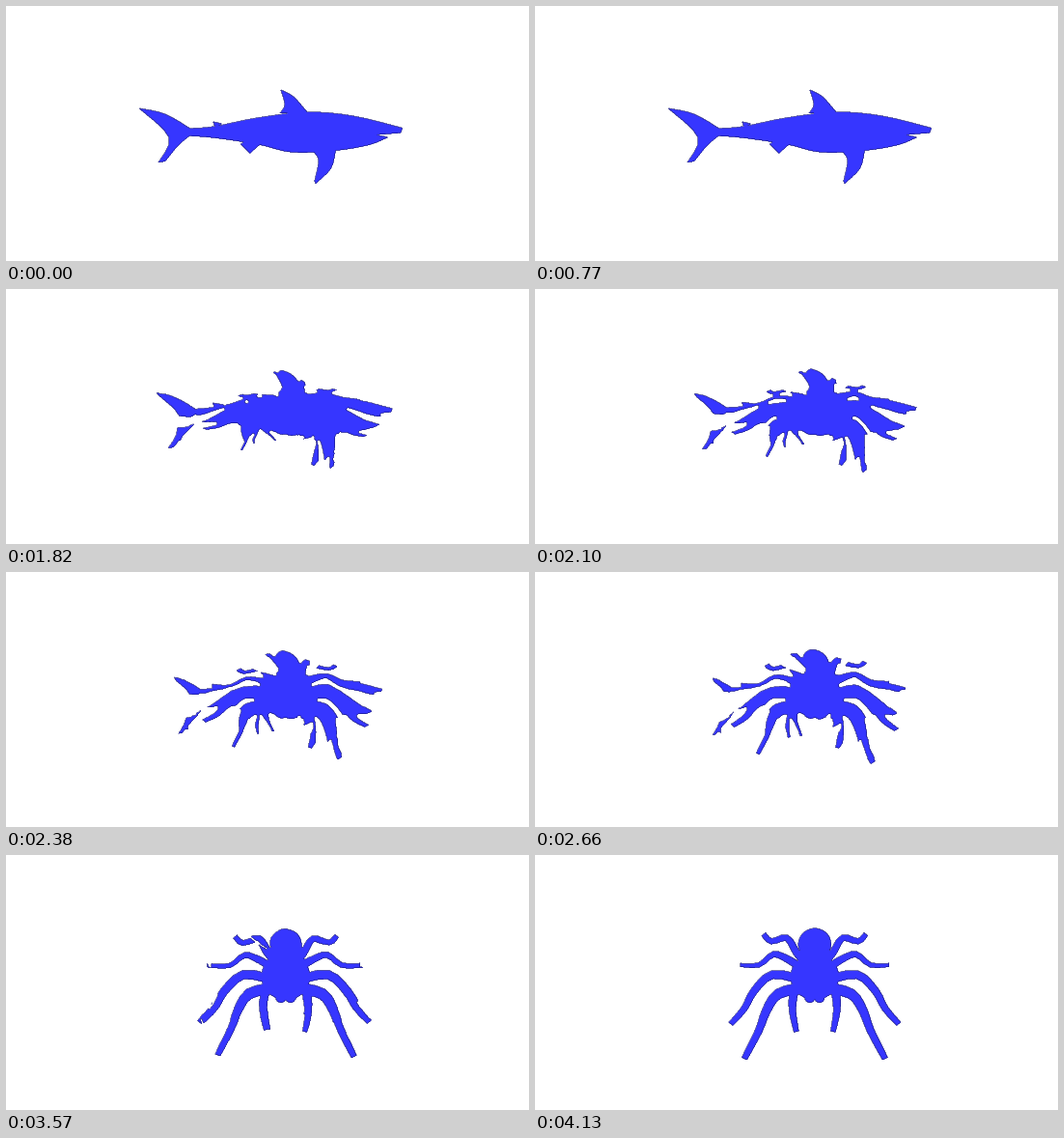
These frames come from a looping animation (542x264 px, 4.83 s). An HTML page with a canvas:

```html
<!DOCTYPE html>
<html lang="en">
<head>
<meta charset="utf-8">
<title>Shark to spider</title>
<style>
  html, body { margin: 0; width: 100%; height: 100%; overflow: hidden; background: #fff; }
  canvas { display: block; }
</style>
</head>
<body>
<canvas id="stage" width="542" height="264"></canvas>
<script>
const FRAME_MS = 70, LOOP_MS = 4830, HOLD_FRAMES = 10, LAST_STEP = 49;
const LEFT = 134, TOP = 72, WIDTH = 282, HEIGHT = 144, SCALE = 2;
const COLS = WIDTH * SCALE, ROWS = HEIGHT * SCALE, COUNT = COLS * ROWS;
const FARTHEST = 75, AXIS = 290;
const WHITE = [255, 255, 255], FILL = [54, 54, 255], EDGE = [16, 16, 110];

const mix = (a, b, t) => a + (b - a) * t;

// Catmull-Rom curve through key points.
function spline(keys, steps = 4) {
  const at = i => keys[Math.max(0, Math.min(keys.length - 1, i))];
  const curve = [];
  for (let i = 0; i < keys.length - 1; i++) {
    for (let s = 0; s < steps; s++) {
      const t = s / steps;
      curve.push([0, 1].map(k => {
        const a = at(i - 1)[k], b = at(i)[k], c = at(i + 1)[k], d = at(i + 2)[k];
        return b + t / 2 * (c - a + t * (2 * a - 5 * b + 4 * c - d + t * (3 * (b - c) + d - a)));
      }));
    }
  }
  return [...curve, at(keys.length - 1)];
}

function ellipse(cx, cy, rx, ry, sides = 28) {
  return Array.from({ length: sides }, (_, i) => {
    const turn = i * 2 * Math.PI / sides;
    return [cx + rx * Math.cos(turn), cy + ry * Math.sin(turn)];
  });
}

// A tapering limb around a curved centre line.
function limb(keys, rootRadius, tipRadius) {
  const line = spline(keys, 3), last = line.length - 1;
  const side = sign => line.map(([x, y], i) => {
    const a = line[Math.max(0, i - 1)], b = line[Math.min(last, i + 1)];
    const dx = b[0] - a[0], dy = b[1] - a[1];
    const offset = sign * mix(rootRadius, tipRadius, i / last) / Math.hypot(dx, dy);
    return [x - dy * offset, y + dx * offset];
  });
  return [...side(1), ...side(-1).reverse()];
}

const mirror = points => points.map(([x, y]) => [2 * AXIS - x, y]);

const sharkParts = [
  [
    ...spline([[188, 127], [215, 125], [260, 116], [312, 110], [360, 114], [411, 126.5]]),
    [409, 131.5], [384, 133.5],
    ...spline([[396, 136], [376, 144], [340, 150], [296, 151.5], [262, 143.5], [215, 136.5], [188, 134.5]])
  ],
  [
    ...spline([[138, 106], [165, 112], [191, 127]]),
    ...spline([[191, 134], [179, 144], [165, 161]]),
    ...spline([[158, 162], [169, 136], [138, 106]])
  ],
  [...spline([[284, 111], [289, 102], [285, 87]]), ...spline([[285, 87], [298, 94], [314, 112]])],
  [...spline([[342, 148], [337, 168], [321, 184]]), ...spline([[320, 181], [324, 159], [316, 149]])],
  [[266, 141], [253, 152.5], [243, 143], [250, 139]],
  [[215, 120], [224, 122], [217, 126]]
];

const leftSide = [
  limb([[279, 110], [271, 101], [261, 86], [245, 89.5], [237, 82]], 4, 2.6),
  limb([[276, 117], [262, 108], [247, 103], [232, 114], [213, 114]], 4.2, 1.8),
  limb([[276, 129], [246, 124], [227, 141], [217, 159], [203, 175]], 4.8, 2.8),
  limb([[276, 138], [252, 144], [240, 161], [232, 182], [217, 211]], 6, 3),
  limb([[268, 143], [267, 161], [271, 183]], 4.6, 2.5),
  ellipse(285, 147, 5.5, 6, 14)
];
const spiderParts = [
  ellipse(AXIS, 126, 25, 24), ellipse(AXIS, 92.5, 17, 16.5), ...leftSide, ...leftSide.map(mirror)
];

function toSegments(points) {
  return points.map(([x, y], i) => {
    const next = points[(i + 1) % points.length];
    const dx = next[0] - x, dy = next[1] - y;
    return { x, y, dx, dy, inverse: 1 / (dx * dx + dy * dy || 1) };
  });
}

function toPart(points) {
  const xs = points.map(p => p[0]), ys = points.map(p => p[1]);
  return {
    segments: toSegments(points),
    x0: Math.min(...xs), x1: Math.max(...xs), y0: Math.min(...ys), y1: Math.max(...ys)
  };
}

// For every sample: distance to the shape, its nearest point, and whether it is inside.
function buildField(outlines) {
  const parts = outlines.map(toPart);
  const field = {};
  for (const key of ["distance", "nearX", "nearY", "inside"]) field[key] = new Float32Array(COUNT);

  for (let index = 0; index < COUNT; index++) {
    const x = sampleX(index), y = sampleY(index);
    let best = Infinity, bestX = x, bestY = y, covered = false;
    for (const part of parts) {
      const gapX = Math.max(part.x0 - x, 0, x - part.x1), gapY = Math.max(part.y0 - y, 0, y - part.y1);
      if (gapX * gapX + gapY * gapY > best) continue;
      let odd = false;
      for (const s of part.segments) {
        const px = x - s.x, py = y - s.y;
        if ((py < 0) !== (py < s.dy) && px < s.dx * py / s.dy) odd = !odd;
        let along = (px * s.dx + py * s.dy) * s.inverse;
        along = along < 0 ? 0 : along > 1 ? 1 : along;
        const ex = px - along * s.dx, ey = py - along * s.dy;
        const squared = ex * ex + ey * ey;
        if (squared < best) { best = squared; bestX = x - ex; bestY = y - ey; }
      }
      if (odd) { covered = true; break; }
    }
    field.inside[index] = covered ? 1 : 0;
    field.distance[index] = covered ? 0 : Math.sqrt(best);
    field.nearX[index] = covered ? x : bestX;
    field.nearY[index] = covered ? y : bestY;
  }
  return field;
}

function sampleX(index) { return LEFT + (index % COLS + 0.5) / SCALE; }
function sampleY(index) { return TOP + (Math.floor(index / COLS) + 0.5) / SCALE; }

function lookUp(values, x, y) {
  const u = (x - LEFT) * SCALE - 0.5, v = (y - TOP) * SCALE - 0.5;
  const col = Math.floor(u), row = Math.floor(v);
  if (col < 0 || row < 0 || col >= COLS - 1 || row >= ROWS - 1) return 0;
  const i = row * COLS + col;
  return mix(
    mix(values[i], values[i + 1], u - col),
    mix(values[i + COLS], values[i + COLS + 1], u - col), v - row);
}

// True if a point of "from", moved towards its nearest point in "to", lands on this sample.
function reaches(from, to, remaining, index) {
  if (remaining < 1e-6 || to.inside[index]) return false;
  const nearX = to.nearX[index], nearY = to.nearY[index];
  const startX = nearX + (sampleX(index) - nearX) / remaining;
  const startY = nearY + (sampleY(index) - nearY) / remaining;
  if (lookUp(from.inside, startX, startY) < 0.5) return false;
  return lookUp(to.distance, startX, startY) > to.distance[index] / remaining - 0.3;
}

// Spreads one mask value outwards by a radius in samples.
function spread(mask, value, radius) {
  const result = mask.slice(), disc = [];
  const reach = Math.floor(radius);
  for (let dy = -reach; dy <= reach; dy++) {
    for (let dx = -reach; dx <= reach; dx++) {
      if (dx * dx + dy * dy <= radius * radius) disc.push(dy * COLS + dx);
    }
  }
  for (let i = COLS; i < COUNT - COLS; i++) {
    if (mask[i] !== value) continue;
    if (mask[i - 1] + mask[i + 1] + mask[i - COLS] + mask[i + COLS] === 4 * value) continue;
    for (const offset of disc) result[i + offset] = value;
  }
  return result;
}

function morph(blend) {
  const mask = new Uint8Array(COUNT);
  for (let i = 0; i < COUNT; i++) {
    mask[i] = (shark.inside[i] && spider.inside[i]) ||
      reaches(shark, spider, 1 - blend, i) || reaches(spider, shark, blend, i) ? 1 : 0;
  }
  // Close narrow gaps, but never beyond the reach of either shape.
  const radius = 1 + 12 * blend * (1 - blend);
  const closed = spread(spread(mask, 1, radius), 0, radius);
  return closed.map((on, i) =>
    on && shark.distance[i] <= blend * FARTHEST && spider.distance[i] <= (1 - blend) * FARTHEST ? 1 : 0);
}

const shark = buildField(sharkParts);
const spider = buildField(spiderParts);
const context = document.getElementById("stage").getContext("2d");
const image = context.createImageData(WIDTH, HEIGHT);

function paint(blend) {
  const mask = morph(blend);
  for (let py = 0, out = 0; py < HEIGHT; py++) {
    for (let px = 0; px < WIDTH; px++, out += 4) {
      let covered = 0, edges = 0;
      for (let s = 0; s < SCALE * SCALE; s++) {
        const i = (py * SCALE + Math.floor(s / SCALE)) * COLS + px * SCALE + s % SCALE;
        covered += mask[i];
        if (mask[i] !== (mask[i + 1] || 0) || mask[i] !== (mask[i + COLS] || 0)) edges++;
      }
      const cover = covered / (SCALE * SCALE), stroke = Math.min(0.6, edges * 0.28);
      for (let c = 0; c < 3; c++) {
        image.data[out + c] = mix(mix(WHITE[c], FILL[c], cover), EDGE[c], stroke);
      }
      image.data[out + 3] = 255;
    }
  }
  context.putImageData(image, LEFT, TOP);
}

context.fillStyle = "#fff";
context.fillRect(0, 0, 542, 264);
const start = performance.now();
let shownStep = -1;

function tick() {
  const frame = Math.floor(((performance.now() - start) % LOOP_MS) / FRAME_MS);
  const step = Math.max(0, Math.min(LAST_STEP, frame - HOLD_FRAMES));
  if (step !== shownStep) {
    shownStep = step;
    paint((1 - Math.cos(Math.PI * step / LAST_STEP)) / 2);
  }
  requestAnimationFrame(tick);
}
tick();
</script>
</body>
</html>
```
